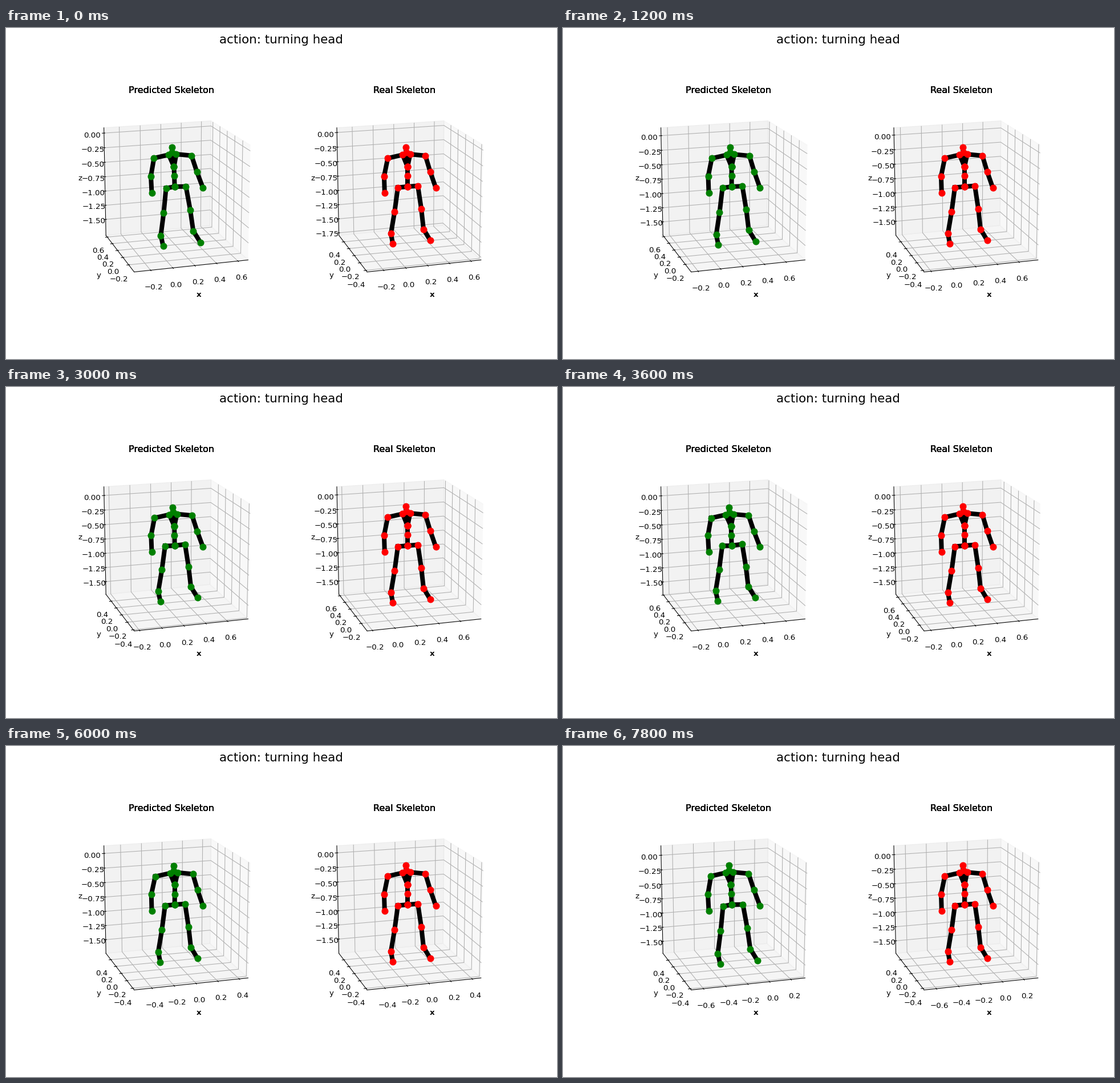
Recreate the animation shown at these times as a matplotlib script. Size 966x580 px, loop 8000 ms.

```python
import numpy as np
import matplotlib.pyplot as plt
from matplotlib.animation import FuncAnimation
from matplotlib.lines import Line2D
from matplotlib.ticker import FuncFormatter
from matplotlib.transforms import Affine2D

W, H, DPI = 966, 580, 96
STEP, FRAMES, HOLD = 200, 40, 3     # each pose is held for three steps
CYCLE = 13                          # poses in one sway of the body
HALF = np.array([0.5, 0.5, 0.9])    # half of the data range on x, y, z
TICK = (0.2, 0.2, 0.25)
PANEL_SHIFT = 408.3

# Key points of the drifting view centre: pose, x, z
DRIFT = np.array([
    (0, 0.175, -0.852), (2, 0.259, -0.808), (4, 0.287, -0.801),
    (6, 0.261, -0.788), (8, 0.109, -0.830), (10, -0.037, -0.812),
    (13, -0.188, -0.781),
]).T

# Standing pose on the stage, limb by limb
ROOT, CHEST = (295.6, 278), (295.6, 243)
TRUNK = [ROOT, (295.7, 259.3), CHEST, (293.3, 218), (293, 209)]
ARMS = [
    [CHEST, (287.1, 222.2), (261, 228.2), (254.6, 259.6), (255.5, 288.6)],
    [CHEST, (300.3, 221.2), (327, 223.8), (335.5, 252.2), (345.2, 280)],
]
LEGS = [
    [ROOT, (278.7, 279.5), (273, 321.9), (266.5, 360.3), (270, 378.3)],
    [ROOT, (313.7, 276.5), (319.8, 317), (323.7, 352.5), (335.4, 372)],
]


def sway(pose):
    phase = 2 * np.pi * pose / CYCLE
    return np.cos(phase), np.cos(2 * phase)


def lean(limb, pose):
    """Move trunk and arms, the more the higher a joint sits."""
    c1, c2 = sway(pose)
    p = np.array(limb, float)
    lift = np.clip((ROOT[1] - p[:, 1]) / 69, 0, 1)
    return p + np.outer(lift, (-0.7 - 1.5 * c2, 0.9 - 1.1 * c1))


def step(limb, pose):
    """Move a leg, the more the lower a joint sits; the root stays."""
    c1, c2 = sway(pose)
    p = np.array(limb, float)
    reach = 1.2 + 0.025 * (p[:, 1] - ROOT[1])
    reach[0] = 0
    return p + np.outer(reach, (0.5 + 0.55 * c1 + 0.45 * c2, c1))


def predicted_limbs(pose):
    return ([lean(limb, pose) for limb in [TRUNK, *ARMS]]
            + [step(limb, pose) for limb in LEGS])


def real_limbs(pose):
    return [np.array(limb) + (PANEL_SHIFT, 0) for limb in [TRUNK, *ARMS, *LEGS]]


def predicted_depth(pose):
    return 0.12 - 0.003 * pose + 0.02 * np.cos(2 * np.pi * (pose - 0.8) / 6.7)


def real_depth(pose):
    return 0.08 + 0.09 * np.exp(-((pose - 6) / 1.2) ** 2)


def decimals(n):
    return FuncFormatter(
        lambda v, _: f"{round(v, n) + 0:.{n}f}".replace("-", "\u2212"))


def ticks(center, half, gap):
    lo = np.ceil((center - half) / gap)
    hi = np.floor((center + half) / gap)
    return np.arange(lo, hi + 1) * gap


class Panel:
    def __init__(self, fig, slot, title, color, limbs, depth, rise):
        self.limbs, self.depth, self.rise = limbs, depth, rise
        self.ax = ax = fig.add_subplot(1, 2, slot, projection="3d")
        ax.view_init(elev=16, azim=-107)
        ax.set_box_aspect((1, 1, 1))
        ax.set_xlabel("x", fontweight="bold")
        ax.set_ylabel("y")
        ax.set_zlabel("z")
        for axis, n in ((ax.xaxis, 1), (ax.yaxis, 1), (ax.zaxis, 2)):
            axis.set_major_formatter(decimals(n))
        # stacked copies give the title its darker edges
        for _ in range(4):
            ax.annotate(title, (0.5, 1), (-0.3, 6.5), xycoords="axes fraction",
                        textcoords="offset points", ha="center",
                        va="baseline", fontsize=12, annotation_clip=False)
        stage = Affine2D().scale(1 / W, -1 / H).translate(0, 1) + fig.transFigure
        self.bones = Line2D([], [], color="black", lw=6, transform=stage, zorder=2)
        self.dots = Line2D([], [], color=color, ls="", marker="o", ms=8,
                           transform=stage, zorder=3)
        fig.add_artist(self.bones)
        fig.add_artist(self.dots)

    def center(self, pose):
        x, z = (np.interp(pose, DRIFT[0], row) for row in DRIFT[1:])
        return np.array([x, self.depth(pose), z + self.rise])

    def show(self, pose):
        ax, mid = self.ax, self.center(pose)
        lo, hi = mid - HALF * 25 / 24, mid + HALF * 25 / 24
        ax.set(xlim=(lo[0], hi[0]), ylim=(lo[1], hi[1]), zlim=(lo[2], hi[2]))
        x, y, z = (ticks(*args) for args in zip(mid, HALF, TICK))
        ax.set(xticks=x, yticks=y, zticks=z)

        # each joint pair is a bone of its own
        limbs = self.limbs(pose)
        gap = (np.nan, np.nan)
        path = [p for limb in limbs for a, b in zip(limb, limb[1:])
                for p in (a, b, gap)]
        self.bones.set_data(*np.array(path).T)
        self.dots.set_data(*np.concatenate(limbs).T)


fig = plt.figure(figsize=(W / DPI, H / DPI), dpi=DPI, facecolor="white")
fig.suptitle("action: turning head", fontsize=16, x=0.4995, y=0.9815)
panels = [
    Panel(fig, 1, "Predicted Skeleton", "green",
          predicted_limbs, predicted_depth, 0.005),
    Panel(fig, 2, "Real Skeleton", "red", real_limbs, real_depth, -0.005),
]


def draw(i):
    for panel in panels:
        panel.show(i // HOLD)
    return []


anim = FuncAnimation(fig, draw, frames=FRAMES, interval=STEP,
                     init_func=lambda: draw(0), repeat=True, repeat_delay=0,
                     blit=False)
plt.show()
```
